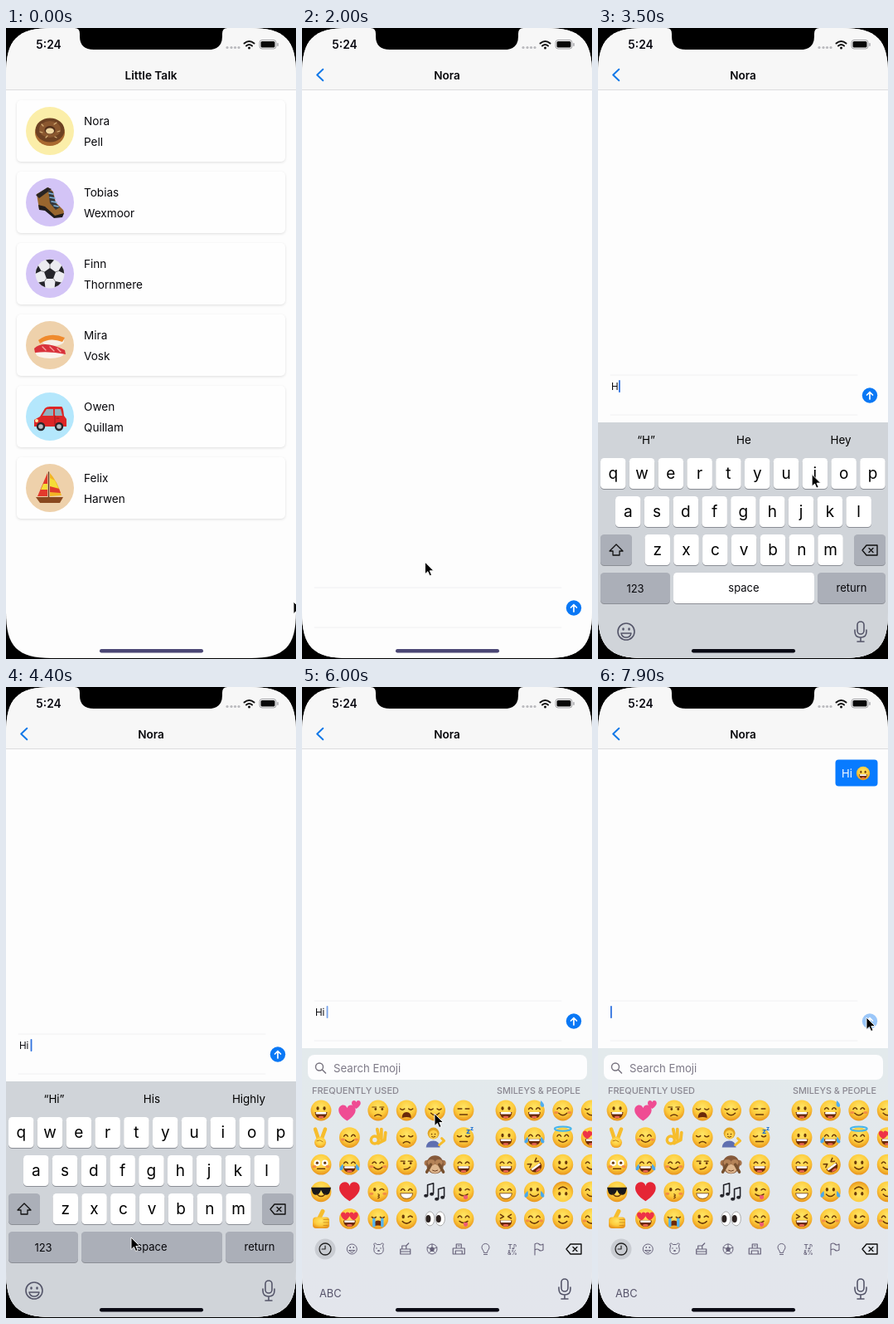
Write an HTML page that moves like this. It is 350x760 px and loops after 8000 ms.

```html
<!DOCTYPE html>
<html lang="en">
<head>
<meta charset="utf-8">
<title>Little Talk</title>
<style>
html, body { margin: 0; width: 100%; height: 100%; overflow: hidden; background: #000; }
svg { display: block; width: 350px; height: 760px; font-family: Inter, "Liberation Sans", sans-serif; }
.card { fill: #fefefe; filter: drop-shadow(0 1px 1.5px rgba(0,0,0,.12)); }
</style>
</head>
<body>
<svg id="stage" viewBox="0 0 350 760" xmlns="http://www.w3.org/2000/svg"></svg>
<script>
const BLUE = '#0a78f5', BROWN = '#6a3908', ICON = '#67627a', GRAY = '#abafb8', INK = '#55566a';
const LOOP = 8000;

// ---- drawing helpers ----
const at = (x, y, s, k = 1) => `<g transform="translate(${x} ${y}) scale(${k})">${s}</g>`;
const group = (id, s) => `<g id="${id}">${s}</g>`;
const rect = (x, y, w, h, fill, r = 0, more = '') =>
  `<rect x="${x}" y="${y}" width="${w}" height="${h}" rx="${r}" fill="${fill}" ${more}/>`;
const dot = (x, y, r, fill, ry = r) => `<ellipse cx="${x}" cy="${y}" rx="${r}" ry="${ry}" fill="${fill}"/>`;
const ring = (x, y, r, color, w = 1) => `<circle cx="${x}" cy="${y}" r="${r}" fill="none" stroke="${color}" stroke-width="${w}"/>`;
const shape = (d, fill) => `<path d="${d}" fill="${fill}"/>`;
const line = (d, color = BROWN, w = 1.5) =>
  `<path d="${d}" fill="none" stroke="${color}" stroke-width="${w}" stroke-linecap="round" stroke-linejoin="round"/>`;
const text = (x, y, s, size = 13.4, fill = '#08080c', weight = 400, anchor = 'start') =>
  `<text x="${x}" y="${y}" font-size="${size}" fill="${fill}" font-weight="${weight}" text-anchor="${anchor}">${s}</text>`;
const mid = (x, y, s, size, fill, weight) => text(x, y, s, size, fill, weight, 'middle');
const pair = f => f(-1) + f(1);
const heart = (fill, k) => at(0, 0, shape('M0 10C-16 0 -11 -10 -5 -10Q-1 -10 0 -6Q1 -10 5 -10C11 -10 16 0 0 10Z', fill), k);

// ---- emoji ----
const eyes = {
  o: pair(s => dot(s * 4, -2.5, 1.6, BROWN, 2.3)),
  n: pair(s => line(`M${s * 4.5 - 2.3} -1.5q2.3 -3.6 4.6 0`)),
  u: pair(s => line(`M${s * 5 - 2.5} -2q2.5 2.4 5 0`)),
  d: pair(s => line(`M${s * 4.5 - 2.3} -2h4.6`)),
  x: pair(s => line(`M${s * 6.5} -5l${-s * 4} 2.4l${s * 4} 2.2`)),
  h: pair(s => at(s * 5, -3, heart('#ee3347', .5))),
  w: pair(s => dot(s * 4.7, -2, 3.8, '#fff') + dot(s * 4.7, -2, 1.6, BROWN)),
  W: dot(-4, -2.5, 1.7, BROWN, 2.3) + line('M2 -2q2.5 -2.5 5 0'),
  s: pair(s => dot(s * 4 + 1, -1.5, 1.4, BROWN) + line(`M${s * 4.5 - 2.5} -4h5`, BROWN, 1.2)),
  g: shape('M-12 -5h24l-1 4q-1 5 -5 5q-4 0 -6 -6q-2 6 -6 6q-4 0 -5 -5z', '#18181b')
};
const mouths = {
  D: shape('M-7.5 2h15q-.5 7.5 -7.5 7.5q-7 0 -7.5 -7.5z', '#6b2a0a') + rect(-6.3, 2, 12.6, 2.5, '#fff', 1) + dot(0, 8, 3.2, '#ee6655', 1.3),
  s: line('M-5 3.2q5 5 10 0'),
  f: line('M-4 6.5q4 -3.2 8 0'),
  l: line('M-4.5 5h9'),
  k: line('M-3 5.5q4.5 .5 7 -2.5'),
  t: `<path d="M-7.5 2h15q-1 6.500 -7.5 6.5q-6.5 0 -7.5 -6.5z" fill="#fff" stroke="${BROWN}" stroke-width=".8"/>`,
  O: shape('M-5.5 9q0 -7 5.5 -7q5.5 0 5.5 7q-5.5 -2 -11 0z', '#6b2a0a'),
  p: line('M-5 3q5 4 10 0') + shape('M0 4.5h5v3q-2.5 4 -5 0z', '#ef5c72'),
  i: line('M0 3q3 1 0 2.5q3 1 0 2.5', BROWN, 1.2)
};
const extras = {
  t: pair(s => shape(`M${s * 8} -1q${s * 6} 6 ${s * 3} 8q${-s * 5} 0 ${-s * 3} -8z`, '#4aa9ec')),
  j: pair(s => rect(s * 5 - 1.7, -1, 3.4, 11, '#55b4ef', 1.5)),
  S: shape('M8 -12q6 6 2.5 8q-5 0 -2.5 -8z', '#50aeef'),
  b: pair(s => dot(s * 8, 2.5, 2.6, '#f28d46', 1.6)),
  a: '<ellipse cy="-10.5" rx="10" ry="2.6" fill="none" stroke="#45b5ea" stroke-width="2"/>',
  Z: text(3, -5, 'z', 9, '#2374cf', 800) + text(8, -9, 'z', 7, '#2374cf', 800),
  H: at(8, 6, heart('#ef3148', .5))
};
function face(code) {
  const [e, m, ...more] = code;
  const turn = more.includes('U') ? 180 : more.includes('r') ? -35 : 0;
  return `<g transform="rotate(${turn})">` + dot(0, 0, 12.4, 'url(#skin)') + eyes[e] + mouths[m] +
    more.map(c => extras[c] || '').join('') + '</g>';
}
const HAND = '#f6bd2d', NOTE = '#23232a';
const pictures = {
  hearts: at(-3, 3, heart('#ef4c93', .95)) + at(8, -7, heart('#ef4c93', .5)),
  heart: heart('#e52535', 1.15),
  peace: line('M-3 2L-7 -10M1 1L5 -10', HAND, 4.5) + dot(-1, 6, 7, 'url(#skin)', 6.5) + line('M-5 4q4 -2 7 1', '#b87912', 1),
  ok: ring(-4, 3, 4.5, HAND, 3.5) + line('M0 7L8 3L9 -6M4 2L4 -10M1 0L-1 -10', HAND, 3.8),
  thumb: line('M-3 1L2 -9', HAND, 5) + rect(-10, -2, 20, 13.5, 'url(#skin)', 4) + line('M3 1h6M3 4.5h6M3 8h5', '#c6851b', .8),
  person: shape('M-11 12q1 -8 9 -8q7 0 8 8z', '#5f6fb0') + dot(-2, -5, 7, '#e0a322') + dot(-2, -3.5, 5.3, '#fdd04a') +
    pair(s => dot(s * 2 - 2, -4, .8, BROWN)) + line('M-4 -1q2 1.500 4 0', BROWN, 1) + line('M5 9L11 4L8 1', HAND, 3),
  monkey: pair(s => dot(s * 9.5, -2, 3.5, '#a8754c')) + dot(0, 0, 10.5, '#85593a', 11) + dot(0, 5, 7, '#dfb78e', 5.5) +
    pair(s => dot(s * 4.5, -2.5, 4.6, '#b48257', 3.8) + line(`M${s * 5} 0L${s * 10} 9`, '#77502f', 3.5)) + line('M-3 7q3 2 6 0', '#67371a', 1),
  notes: line('M-9 5V-8L-2 -10V2M4 9V-3L11 -5V6', NOTE, 1.6) + [[-11, 5], [-4, 3], [2, 9], [9, 7]].map(p => dot(...p, 2.5, NOTE, 2)).join(''),
  eyes: pair(s => `<ellipse cx="${s * 6.2}" rx="5.6" ry="8.500" fill="#fff" stroke="#999" stroke-width=".8"/>` + dot(s * 6.2 - 2, 0, 3, '#2b2220', 4.5))
};
const emoji = code => pictures[code] || face(code);

const frequent = `oD hearts sf uO us dl
  peace nsb ok uf person ulZ
  wlb nDt nsb sk monkey nD
  gs heart Wib nt notes Wp
  thumb hD uOj Ws eyes np`;
const smileys = `oD nDS nsb us
  oD nDt nsa hD
  nD xDr os nsH
  nt ost osU nsH
  xD nsb Ws nsb`;
const grid = (src, x0) => src.trim().split('\n').map((row, r) =>
  row.trim().split(/\s+/).map((c, i) => at(x0 + i * 34.4, 510 + r * 32.6, emoji(c))).join('')).join('');

// ---- contact list ----
const donut = dot(0, 2, 18, '#a9692f', 16) + dot(0, -1, 17.5, '#6d4122', 14.5) + dot(0, -2, 13, '#8a572f', 10) + dot(0, -1, 6.5, '#53301a', 5) + dot(0, 0, 5, '#f1d7a0', 3.5) +
  line('M-10 -8l2 2M8 -10l-3 2M12 0l-3 1M-12 1l3 1M-5 8l2 -2M6 7l2 1', '#d6b078', 1.2);
const boot = shape('M-16 -10L-2 -18L4 -13L7 0L16 9Q19 14 13 18L5 18L-5 8L-13 8L-14 2Z', '#99662e') + shape('M-17 -9L-3 -18L2 -16L-13 -5Z', '#2a2523') +
  shape('M-14 3L-6 5L6 16L17 13L15 18L5 19L-6 10L-13 9Z', '#211d1c') + shape('M-2 -15L3 -13L7 1L12 6L7 9L0 1Z', '#34383e') +
  line('M-1 -11l5 1M0 -6l6 1M2 -1l6 1M5 4l5 1', '#7fb2da', 1.6);
const ball = dot(0, 0, 17.500, '#ececf0') + shape('M0 -7L7 -2L4 6H-4L-7 -2Z', '#25252a') +
  [0, 72, 144, 216, 288].map(a => `<g transform="rotate(${a})">${shape('M-5 -16.5Q0 -18 5 -16.5L0 -11Z', '#25252a') + line('M0 -11V-7', '#777', .8)}</g>`).join('');
const sushi = dot(4, -5, 13, '#f7efe5', 6) + shape('M-14 -6Q0 -17 18 -9L15 -4Q0 -10 -12 -2Z', '#ef8a2d') +
  dot(0, 10, 17, '#fbf4ec', 6) + shape('M-19 4Q-8 -7 18 6L19 11Q0 7 -18 9Z', '#d9323b') + line('M-9 2l4 4M0 2l5 5M9 4l4 4', '#f6a7a0', 1.3);
const car = shape('M-19 4L-12 0L-6 -10Q-4 -12 0 -12H14Q16 -12 17 -1L20 3V12H-19Z', '#dd2626') + shape('M-9 -1L-4 -9H4V-1ZM6 -9H13L15 -1H6Z', '#8fb0bd') +
  pair(s => dot(s * 11, 12, 5.2, '#27272c') + dot(s * 11, 12, 2.8, '#b9bcc1')) + line('M6 -1V11M8 2h3', '#98181a', 1) + dot(-16, 5, 2, '#ffe7a0');
const boat = shape('M-3 -18V10H-15Z', '#e33a2c') + shape('M0 -18Q9 -8 14 9L0 10Z', '#f2b424') + shape('M-8 -5H-3V2H-11ZM0 -12L6 -9L10 0L0 -1Z', '#f5dc37') +
  shape('M0 -2L11 1L13 6L0 5Z', '#df3b2c') + line('M-1.5 -19V12', '#6b3b1f', 1.4) + shape('M-17 11H16L12 18H-12Z', '#8a491f');
const people = [
  ['Nora', 'Pell', '#fbeea9', donut], ['Tobias', 'Wexmoor', '#d3c4f6', boot], ['Finn', 'Thornmere', '#d3c4f6', ball],
  ['Mira', 'Vosk', '#eed1ab', sushi], ['Owen', 'Quillam', '#b4e7fc', car], ['Felix', 'Harwen', '#eed1ab', boat]
];
const contacts = people.map(([first, last, color, art], i) => at(0, i * 86,
  rect(13, 87, 324, 74, '#fefefe', 5, 'class="card"') +
  `<circle id="disc${i}" cx="53" cy="124" r="29" fill="${color}"/>` + at(53, 124, art) +
  text(94, 116.5, first, 13.6) + text(94, 141.5, last, 13.6))).join('');

// ---- keyboards ----
const key = (x, y, w, fill = '#fff', id = '') =>
  rect(x, y + 1, w, 37, '#8b8e95', 4.5) + rect(x, y, w, 37, fill, 4.5, id && `id="${id}"`);
const rows = [['QWERTYUIOP', 3, 518], ['ASDFGHJKL', 21, 564], ['ZXCVBNM', 56.5, 610]];
const letters = rows.map(([chars, x, y]) => [...chars].map((c, i) =>
  key(x + i * 34.8, y, 30.5) + `<text class="letter" x="${x + 15.25 + i * 34.8}" y="${y + 25}" font-size="19" text-anchor="middle">${c}</text>`).join('')).join('');
const erase = (x, y) => at(x, y, line('M-9 0L-4 -6H9V6H-4ZM-1 -2.5l5 5m0 -5l-5 5', '#111', 1.4));
const smile = ring(0, 0, 10, INK, 1.6) + pair(s => dot(s * 3.5, -3, 1.3, INK, 1.8)) + line('M-6 2h12q-1 5 -6 5q-5 0 -6 -5z', INK, 1.4);
const mic = line('M-4 -8a4 4 0 0 1 8 0v7a4 4 0 0 1 -8 0zM-7 -2v2q0 7 7 7q7 0 7 -7v-2M0 7v5M-4 12h8', INK, 1.6);
const letterBoard = rect(0, 475, 350, 300, '#d0d4d9') +
  [58, 176, 293].map((x, i) => `<text id="hint${i}" x="${x}" y="501" font-size="13.4" text-anchor="middle"></text>`).join('') +
  letters + key(3, 610, 38, '#fff', 'shift') +
  '<path id="arrow" transform="translate(22 629)" d="M0 -7L8 1H4V6H-4V1H-8Z" stroke="#111" stroke-width="1.3" stroke-linejoin="round"/>' +
  key(309, 610, 38, GRAY) + erase(328, 629) +
  key(3, 656, 84, GRAY) + mid(45, 679.5, '123', 13) + key(91, 656, 170, '#fff', 'space') + mid(176, 678.5, 'space', 13) +
  key(265, 656, 82, GRAY) + mid(306, 678.5, 'return', 13) + at(34, 727, smile) + at(317, 727, mic);

const tabs = [
  ring(0, 0, 7, '#222', 1.3) + line('M0 -4V0H-4', '#222', 1.2),
  ring(0, 0, 6, ICON) + pair(s => dot(s * 2, -2, .9, ICON)) + line('M-3.5 1.5h7q-3.5 5 -7 0', ICON, 1),
  line('M-5 -4q-2 -3 1 -3l2 1.5h4l2 -1.5q3 0 1 3q3 10 -5 10q-8 0 -5 -10', ICON, 1) + pair(s => dot(s * 2.5, -1, .8, ICON)) + dot(0, 2, 1.5, ICON, 1),
  line('M-6 0h12v6h-12zM-4 0v-4h5v4M1 -4l3 -3M-6 3h12', ICON, 1.2),
  ring(0, 0, 6, ICON) + shape('M0 -3L3 -1L2 3H-2L-3 -1Z', ICON) + line('M0 -3v-3M3 -1l3 -1M2 3l2 2M-2 3l-2 2M-3 -1l-3 -1', ICON, 1),
  line('M-7 6V-1H-3V-6H3V-1H7V6ZM-3 -1H3M-4 6V2H4V6M-1 -4h2', ICON, 1.2),
  line('M-2 4q0 -2 -2 -4a4.5 4.5 0 1 1 8 0q-2 2 -2 4zM-2 6.5h4', ICON, 1),
  mid(0, -.5, 'T♪', 8, ICON, 600) + mid(0, 6.5, '&amp;%', 7, ICON, 600),
  line('M-5 7V-6q3 -2 5 0q2 2 5 0v7q-3 2 -5 0q-2 -2 -5 0', ICON, 1.1)
];
const emojiBoard = rect(0, 435, 350, 340, 'url(#board)') + rect(7, 443, 337, 30, '#fdfdfe', 8) +
  ring(21, 457.5, 4.5, '#77737f', 1.4) + line('M24.5 461l4 4', '#77737f', 1.5) +
  text(38, 463.5, 'Search Emoji', 13.2, '#7d7987') +
  text(12, 490, 'FREQUENTLY USED', 11, '#8a8791', 500) + text(235, 490, 'SMILEYS &amp; PEOPLE', 10.8, '#8a8791', 500) +
  grid(frequent, 23) + grid(smileys, 246) + dot(28, 677, 12.5, '#c9ccd2') +
  tabs.map((s, i) => at(28 + i * 32.25, 677, s)).join('') + erase(328, 677) +
  text(21, 735, 'ABC', 12.8, '#56536a') + at(317, 725, mic);

// ---- whole stage ----
const composer = line('M15 674H313M15 722H313', '#f0f0f2', 1) + text(16, 691.5, '<tspan id="typed"></tspan>', 11.6) +
  group('typedFace', at(38, 687, face('oD'), .5)) + rect(0, 680, 1.8, 15, '#2f72df', .8, 'id="caret"') +
  group('send', dot(328, 698.5, 9.2, BLUE) + line('M328 703V694.5M324.5 698L328 694.5L331.5 698', '#fff', 1.7));
const bubble = rect(286.5, 87.5, 51, 32, '#087bff', 4) + text(294, 108.5, 'Hi', 13, '#fff') + at(320, 104, face('oD'), .66);
const status = mid(51.5, 25, '5:24', 13.8, '#0a0a12', 600) + [267, 272, 276.5, 281].map(x => dot(x, 23.5, 1.6, '#b9b9bd')).join('') +
  line('M287.5 18.5q6 -5 12 0M290 21.5q3.5 -3 7 0', '#111', 2) + dot(293.5, 24, 1.5, '#111') +
  '<rect x="306" y="14.5" width="20" height="10.5" rx="3" fill="none" stroke="#a2a2a6"/>' + rect(307.5, 16, 17, 7.5, '#080808', 1.6) + rect(327.3, 18, 1.4, 4, '#a2a2a6', .7);

const stage = document.getElementById('stage');
stage.innerHTML = `<defs>
  <radialGradient id="skin" cy=".35" r=".65"><stop stop-color="#ffe566"/><stop offset=".6" stop-color="#fdcb3c"/><stop offset="1" stop-color="#e8941c"/></radialGradient>
  <linearGradient id="board" x2="0" y2="1"><stop stop-color="#e3eaec"/><stop offset="1" stop-color="#e3e5ec"/></linearGradient>
  <clipPath id="screen"><path d="M0 55C0 14 14 0 55 0H295C336 0 350 14 350 55V704C350 745 336 759 295 759H55C14 759 0 745 0 704Z"/></clipPath></defs>
  <rect width="350" height="760"/><g clip-path="url(#screen)">` +
  rect(0, 0, 350, 760, '#fdfdfd') +
  group('list', contacts) + rect(0, 75, 350, 690, '#000', 0, 'id="dim"') +
  group('chat', rect(0, 75, 350, 690, '#fdfdfd') + group('bubble', bubble) + group('composer', composer)) +
  group('letterBoard', letterBoard) + group('emojiBoard', emojiBoard) +
  rect(0, 0, 350, 74, '#f7f7f7') + rect(0, 74, 350, 1, '#dcdcde') + status +
  group('back', line('M25.3 49.8L18.2 56.5L25.3 63.2', '#1479e8', 2)) +
  group('listTitle', mid(175, 61.5, 'Little Talk', 13.6, '#08080c', 600)) +
  group('chatTitle', mid(175, 61.5, 'Nora', 13.6, '#08080c', 600)) +
  rect(113, 748, 125, 4.5, '#4b4775', 2.2, 'id="home"') +
  group('pointer', '<path d="M0 0V14.5L3.4 11.4L5.6 16.5L8 15.5L5.8 10.5H10.5Z" stroke="#fff" stroke-width=".9"/>') +
  shape('M83 0Q89 0 89 7V10Q89 26 106 26H244Q261 26 261 10V7Q261 0 267 0Z', '#000') + '</g>';

// ---- motion ----
const $ = Object.fromEntries([...stage.querySelectorAll('[id]')].map(n => [n.id, n]));
const capitals = [...stage.querySelectorAll('.letter')].map(n => [n, n.textContent]);
const part = (t, start, length) => Math.min(1, Math.max(0, (t - start) / length));
const easeOut = (u, power) => 1 - (1 - u) ** power;
const move = (n, x, y) => n.setAttribute('transform', `translate(${x} ${y})`);
const fade = (n, a) => n.setAttribute('opacity', Math.min(1, Math.max(0, a)));
const fill = (n, color) => n.setAttribute('fill', color);

// time, x, y of the pointer tip
const path = [
  [100, 347, 691], [750, 104, 123], [1600, 104, 123], [2050, 150, 661], [2300, 132, 690], [2500, 125, 688], [2700, 123, 680],
  [3050, 208, 584], [3200, 208, 584], [3550, 261, 535], [3700, 261, 535], [4250, 151, 663], [4500, 151, 663], [4950, 33, 725],
  [5250, 33, 725], [5950, 160, 514], [6100, 160, 514], [6450, 23, 509], [6900, 23, 509], [7600, 324, 398]
];
function pointerAt(t) {
  const i = path.findIndex(p => p[0] > t);
  if (i < 1) return (i ? path[path.length - 1] : path[0]).slice(1);
  const [a, b] = [path[i - 1], path[i]], u = part(t, a[0], b[0] - a[0]), e = u * u * (3 - 2 * u);
  return [a[1] + (b[1] - a[1]) * e, a[2] + (b[2] - a[2]) * e];
}

const EDITS = [2400, 3100, 3600, 4300, 6500, 7800];
const PUSH = 900, EMOJI = 5000;

function draw(t) {
  const push = easeOut(part(t, PUSH, 600), 2.35);
  move($.list, -105 * push, 0);
  fade($.dim, .08 * push);
  move($.chat, 350 * (1 - push), 0);
  fill($.disc0, t < PUSH ? '#fbeea9' : '#eed1ab');
  fade($.back, push * 1.4 - .1);
  const leaving = Math.max(0, push - .35);
  fade($.listTitle, 1 - leaving * 3);
  move($.listTitle, -150 * leaving, 0);
  fade($.chatTitle, push);
  move($.chatTitle, 201 * (1 - push), 0);

  const rise = easeOut(part(t, 2350, 430), 3), lift = easeOut(part(t, 2350, 350), 3), swap = easeOut(part(t, EMOJI, 200), 3);
  move($.composer, 0, -256 * lift - 40 * swap);
  move($.letterBoard, 0, 285 * (1 - rise));
  fade($.letterBoard, t < EMOJI ? 1 : 0);
  move($.emojiBoard, 0, 40 * (1 - swap));
  fade($.emojiBoard, t < EMOJI ? 0 : 1);
  fill($.home, t < 2400 ? '#4b4775' : '#0a0a14');

  const edits = EDITS.filter(e => e <= t), count = edits.length;
  $.typed.textContent = ['', '', 'H', 'Hi', 'Hi', 'Hi', ''][count];
  fade($.typedFace, count === 5 ? 1 : 0);
  $.caret.setAttribute('x', [15, 15, 25, 28, 29.6, 46, 15][count]);
  const idle = t - edits[count - 1] - 500;
  fade($.caret, count ? (idle < 0 ? 1 : .5 + .5 * Math.cos(idle * Math.PI / 500)) : 0);

  const upper = count < 2;
  capitals.forEach(([n, c]) => n.textContent = upper ? c : c.toLowerCase());
  fill($.shift, upper ? '#fff' : GRAY);
  fill($.arrow, upper ? '#111' : 'none');
  fill($.space, t >= 4300 && t < 4500 ? GRAY : '#fff');
  const hints = upper ? ['I', 'The', 'And'] : count === 2 ? ['“H”', 'He', 'Hey'] : ['“Hi”', 'His', 'Highly'];
  hints.forEach((s, i) => $['hint' + i].textContent = s);

  fade($.send, t >= 7700 ? .4 : 1);
  fade($.bubble, t >= 7800 ? 1 : 0);
  move($.pointer, ...pointerAt(t));
}

const start = performance.now();
function tick() {
  draw((performance.now() - start) % LOOP);
  requestAnimationFrame(tick);
}
draw(0);
requestAnimationFrame(tick);
</script>
</body>
</html>
```
